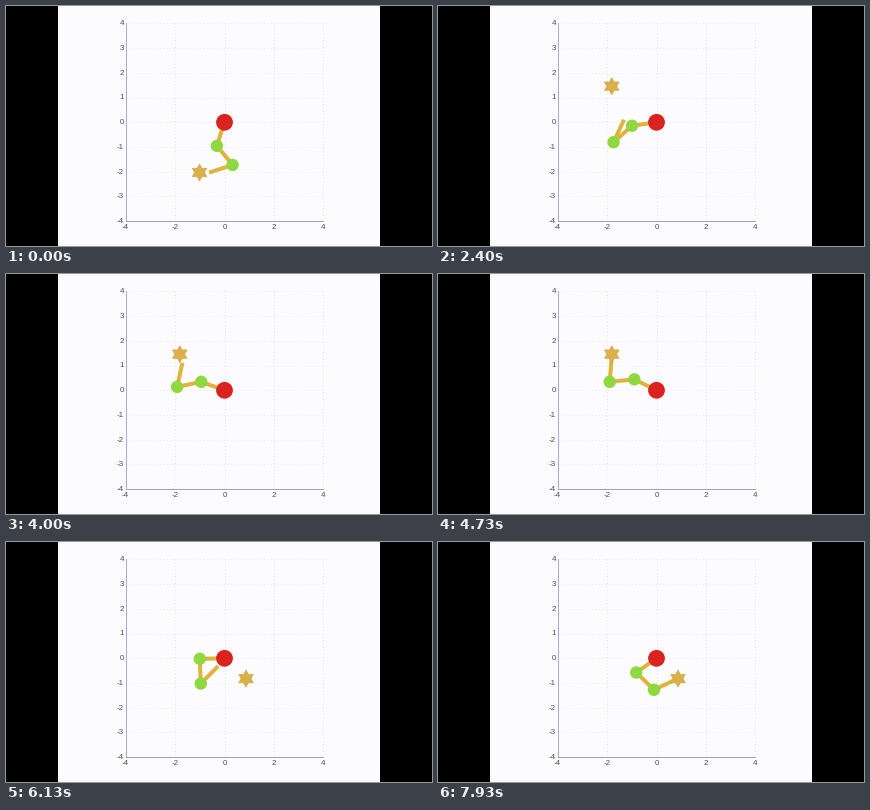
A matplotlib script for the animation above (8 s loop, 426x240 px).

```python
import numpy as np
import matplotlib.pyplot as plt
from matplotlib.animation import FuncAnimation
from matplotlib.patches import Circle, Polygon, Rectangle

W, H, DPI = 426, 240, 100
FRAMES, INTERVAL = 200, 40
STEPS, RATE = 120, 15               # arm moves 15 times a second
PX = 72 / DPI                       # one pixel in points
CX, CY, UNIT = 218.5, 116.3, 24.72  # plot origin and scale in pixels
GAIN = 0.05                         # share of the error removed per step

GOLD, STAR = "#deb43c", "#d9b04a"
GREEN, RED = "#90d840", "#da221e"

# step at which each goal appears, and its position
GOALS = [(0, (-1.01, -2.03)), (19, (-1.81, 1.46)), (72, (0.87, -0.82))]

# absolute link angles (degrees) the arm passes through
POSES = [
    (0, (252.1, 309.3, 198.0)),
    (18, (245.6, 299.1, 194.0)),
    (36, (188.0, 221.7, 65.1)),
    (49, (169.6, 201.5, 67.8)),
    (71, (153.7, 185.7, 85.5)),
    (92, (181.2, 272.3, 45.0)),
    (119, (215.1, 315.6, 25.0)),
]


def goal_at(step):
    return np.array([pos for start, pos in GOALS if start <= step][-1])


def joints(angles):
    """Base, two joints and the tip of an arm with unit links."""
    links = np.column_stack([np.cos(angles), np.sin(angles)])
    return np.vstack([[0, 0], np.cumsum(links, axis=0)])


def ik_step(angles, goal):
    """One pseudo-inverse Jacobian step towards the goal."""
    pts = joints(angles)
    arm = pts[3] - pts[:3]
    jac = np.array([-arm[:, 1], arm[:, 0]])
    turn = np.linalg.pinv(jac, rcond=0.05) @ (GAIN * (goal - pts[3]))
    return angles + np.cumsum(turn)


def solve():
    """Link angles per step: IK motion eased onto the guide poses."""
    out = np.zeros((STEPS, 3))
    for (a, start), (b, end) in zip(POSES, POSES[1:]):
        run = [np.radians(start)]
        for step in range(a + 1, b + 1):
            run.append(ik_step(run[-1], goal_at(step)))
        miss = np.radians(end) - run[-1]
        miss = (miss + np.pi) % (2 * np.pi) - np.pi
        share = np.linspace(0, 1, b - a + 1)[:, None]
        out[a:b + 1] = np.array(run) + share * miss
    return out


def to_px(pts):
    return np.asarray(pts) * [UNIT, -UNIT] + [CX, CY]


def hexagram(center, radius=8.6):
    t = np.pi / 2 + np.arange(12) * np.pi / 6
    r = np.where(np.arange(12) % 2, radius / np.sqrt(3), radius)
    return np.column_stack([center[0] + r * np.cos(t), center[1] - r * np.sin(t)])


fig = plt.figure(figsize=(W / DPI, H / DPI), dpi=DPI, facecolor="black")
ax = fig.add_axes([0, 0, 1, 1])
ax.set_xlim(0, W)
ax.set_ylim(H, 0)
ax.axis("off")
ax.add_patch(Rectangle((52, 0), 322, H, color="#fcfcfe", lw=0))


def draw_axes():
    left, top = to_px((-4, 4))
    right, bottom = to_px((4, -4))
    grid = dict(lw=0.8 * PX, ls=(0, (1.2, 3)), zorder=1)
    axis = dict(lw=PX, zorder=2)
    text = dict(family="Liberation Sans", size=8 * PX, color="#505054")
    for v in range(-4, 5):
        x, y = to_px((v, v))
        ax.plot([left, right], [y, y], color="#eaeae2", **grid)
        ax.text(118, y + 0.3, str(v), ha="right", va="center", **text)
        if v % 2 == 0:
            ax.plot([x, x], [top, bottom], color="#dedaec", **grid)
            ax.text(x, 221.9, str(v), ha="center", va="center", **text)
    ax.plot([left, left], [top, bottom], color="#aaaae0", **axis)
    ax.plot([left, right], [bottom, bottom], color="#a2a2bc", **axis)


draw_axes()
links, = ax.plot([], [], color=GOLD, lw=4 * PX, solid_capstyle="butt",
                 solid_joinstyle="miter", zorder=3)
knees = [ax.add_patch(Circle((0, 0), 6.2, fc=GREEN, lw=0, zorder=4)) for _ in range(2)]
ax.add_patch(Circle((CX, CY), 8.4, fc=RED, lw=0, zorder=5))
star = ax.add_patch(Polygon(hexagram((0, 0)), fc=STAR, ec="#d0a646",
                            lw=0.5 * PX, zorder=6))

ANGLES = solve()


def update(frame):
    step = min(int(frame * INTERVAL * RATE / 1000 + 0.5), STEPS - 1)
    pts = to_px(joints(ANGLES[step]))
    links.set_data(pts[:, 0], pts[:, 1])
    for knee, pos in zip(knees, pts[1:3]):
        knee.center = tuple(pos)
    star.set_xy(hexagram(to_px(goal_at(step))))
    return [links, star, *knees]


anim = FuncAnimation(fig, update, frames=FRAMES, interval=INTERVAL,
                     repeat=True, repeat_delay=0)
plt.show()
```
